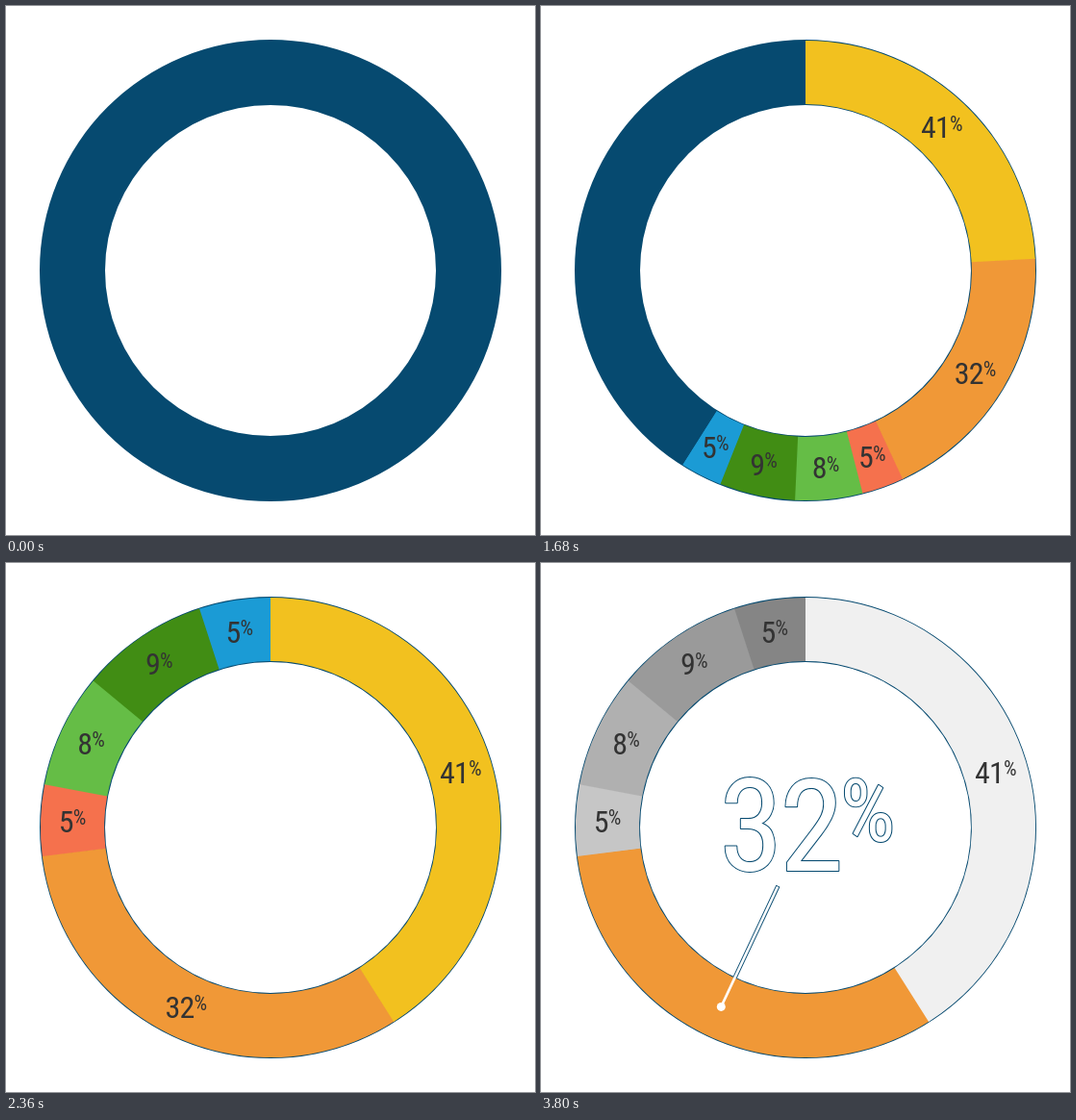
Recreate the animation shown at these times as an HTML page with a canvas. Size 550 px wide and 550 px high, loop 3.84 s.

```html
<!DOCTYPE html>
<html lang="en">
<head>
<meta charset="utf-8">
<title>Ring chart</title>
<style>
  html, body { margin: 0; width: 100%; height: 100%; overflow: hidden; background: #fff; }
  canvas { display: block; width: 550px; height: 550px; }
</style>
</head>
<body>
<canvas id="stage" width="550" height="550"></canvas>
<script>
const ctx = document.getElementById('stage').getContext('2d');
const LOOP = 3840, STEP = 40, TAU = Math.PI * 2;
const CX = 275, CY = 275, OUTER = 240, INNER = 172, LABEL_R = 206, EDGE = 0.9;
const NAVY = '#064a70', INK = 51;
const FAMILY = '"Roboto Condensed", Roboto, sans-serif';
const HIGHLIGHT = 1;

const segments = [
  { value: 41, color: '#f2c11f', muted: '#f0f0f0' },
  { value: 32, color: '#f09837' },
  { value: 5, color: '#f5714d', muted: '#c6c6c6' },
  { value: 8, color: '#65bd46', muted: '#b0b0b0' },
  { value: 9, color: '#418d14', muted: '#9a9a9a' },
  { value: 5, color: '#1b9bd5', muted: '#858585' }
];
let sum = 0;
for (const s of segments) {
  s.start = sum / 100;
  sum += s.value;
  s.end = sum / 100;
}

const lerp = (a, b, k) => a + (b - a) * k;
const expoInOut = x =>
  x <= 0 ? 0 : x >= 1 ? 1 :
  x < 0.5 ? 2 ** (20 * x - 10) / 2 : 1 - 2 ** (10 - 20 * x) / 2;
const progress = (t, start, duration) => expoInOut((t - start) / duration);

function polar(turn, r) {
  const a = turn * TAU;
  return [CX + r * Math.sin(a), CY - r * Math.cos(a)];
}

function ring(from, to, inner, outer, color) {
  const a = from * TAU - TAU / 4, b = to * TAU - TAU / 4;
  ctx.beginPath();
  ctx.arc(CX, CY, outer, a, b);
  ctx.arc(CX, CY, inner, b, a, true);
  ctx.fillStyle = color;
  ctx.fill();
}

function disc(x, y, r, color) {
  ctx.beginPath();
  ctx.arc(x, y, r, 0, TAU);
  ctx.fillStyle = color;
  ctx.fill();
}

function clipped(path, draw) {
  ctx.save();
  ctx.beginPath();
  path();
  ctx.clip();
  draw();
  ctx.restore();
}

const insideHole = draw => clipped(() => ctx.arc(CX, CY, INNER, 0, TAU), draw);

// Number with a small raised percent sign, centred on x, y.
function percent(value, x, y, scale, method) {
  const parts = [[String(value), 32, 11.4, '-0.8px'], ['%', 21.5, 3.9, '0px']];
  const setFont = ([, size, , spacing]) => {
    ctx.font = `400 condensed ${size}px ${FAMILY}`;
    ctx.letterSpacing = spacing;
  };
  const widths = parts.map(p => (setFont(p), ctx.measureText(p[0]).width));
  ctx.save();
  ctx.translate(x, y);
  ctx.scale(scale, scale);
  let left = -(widths[0] + widths[1]) / 2;
  parts.forEach((p, i) => {
    setFont(p);
    ctx[method](p[0], left, p[2]);
    left += widths[i];
  });
  ctx.restore();
}

function drawSegments(reveal, mute, lifted) {
  for (let i = segments.length - 1; i >= 0; i--) {
    const s = segments[i];
    const paint = (end, color) =>
      ring(Math.max(0, s.start * reveal - 0.0005), end, INNER + EDGE, OUTER - EDGE, color);
    const muted = s.muted && mute > s.start;
    if (!muted || mute < s.end) paint(s.end * reveal, s.color);
    if (muted) paint(Math.min(s.end, mute), s.muted);
    if (i === HIGHLIGHT && lifted) continue;
    const [x, y] = polar((s.start + s.end) / 2 * reveal, LABEL_R);
    ctx.fillStyle = `rgb(${INK},${INK},${INK})`;
    percent(s.value, x, y, 1, 'fillText');
  }
}

function line(x0, y0, x1, y1, width, color) {
  ctx.beginPath();
  ctx.moveTo(x0, y0);
  ctx.lineTo(x1, y1);
  ctx.lineWidth = width;
  ctx.strokeStyle = color;
  ctx.stroke();
}

function drawCallout(t) {
  const s = segments[HIGHLIGHT];
  const mid = (s.start + s.end) / 2;
  const [x, y] = polar(mid, LABEL_R);
  const reach = progress(t, 2440, 1200), grow = progress(t, 2400, 1200);

  if (reach > 0) {
    const tip = LABEL_R - 138 * reach;
    insideHole(() => line(x, y, ...polar(mid, tip - 0.9), 4.4, NAVY));
    line(x, y, ...polar(mid, tip), 2.6, '#fff');
    disc(x, y, 4.5 * reach, '#fff');
  }

  const tx = lerp(x, 276.8, grow), ty = lerp(y, 272.5, grow), scale = lerp(1, 4.2, grow);
  const tone = Math.round(lerp(INK, 255, progress(t, 2400, 1000)));
  insideHole(() => {
    ctx.lineJoin = 'round';
    ctx.lineWidth = 2 * grow / scale;
    ctx.strokeStyle = NAVY;
    percent(s.value, tx, ty, scale, 'strokeText');
  });
  ctx.fillStyle = `rgb(${tone},${tone},${tone})`;
  percent(s.value, tx, ty, scale, 'fillText');
}

function draw(t) {
  ctx.fillStyle = '#fff';
  ctx.fillRect(0, 0, 550, 550);
  ring(0, 1, INNER, OUTER, NAVY);

  const reveal = progress(t, 960, 1400);
  const mute = progress(t, 2400, 1400);
  const lifted = t >= 2400;
  if (reveal >= 1) {
    drawSegments(1, mute, lifted);
  } else if (reveal > 0) {
    clipped(() => {
      ctx.moveTo(CX, CY);
      ctx.arc(CX, CY, CX, -TAU / 4, reveal * TAU - TAU / 4);
      ctx.closePath();
    }, () => drawSegments(reveal, 0, false));
  }
  if (lifted) drawCallout(t);
}

const began = performance.now();
function tick() {
  const t = (performance.now() - began) % LOOP;
  draw(Math.floor(t / STEP) * STEP);
  requestAnimationFrame(tick);
}
tick();
</script>
</body>
</html>
```
